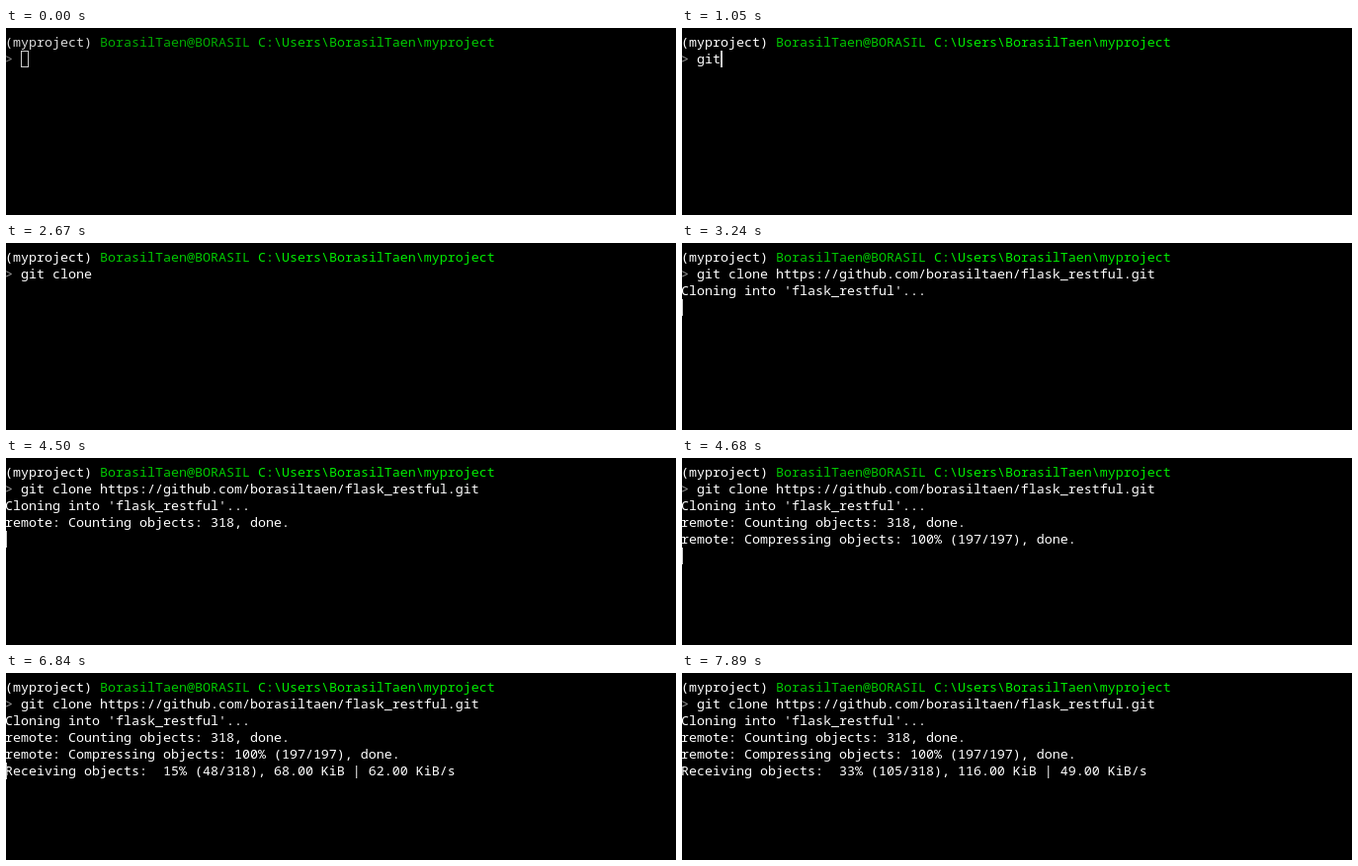
An HTML page for the animation above (8 s loop, 678 px wide and 190 px high).

```html
<!DOCTYPE html>
<html lang="en">
<head>
<meta charset="utf-8">
<title>Terminal clone</title>
<style>
  html, body { margin: 0; width: 100%; height: 100%; overflow: hidden; background: #000; }
  #stage { position: relative; width: 678px; height: 190px; overflow: hidden; background: #000; }
  pre {
    position: absolute; left: -1px; top: 6px; margin: 0; color: #fff;
    font: 13.3333px/17px "Noto Sans Mono", "DejaVu Sans Mono", monospace;
    font-variant-ligatures: none;
  }
  pre div { height: 17px; }
  .user { color: #00c800; }
  .path { color: #00ec00; }
  .mark { color: #a0a0a0; }
  .inactive pre { opacity: .86; }
  #cursor { position: absolute; box-sizing: border-box; width: 2px; height: 17px; background: #ccc; }
  .inactive #cursor { width: 8px; background: none; border: 1px solid #ccc; }
</style>
</head>
<body>
<div id="stage">
  <pre><div>(myproject) <span class="user">BorasilTaen@BORASIL</span> <span class="path">C:\Users\BorasilTaen\myproject</span></div><div><span class="mark">&gt;</span> <span id="typed"></span></div><div class="out"></div><div class="out"></div><div class="out"></div><div class="out"></div></pre>
  <div id="cursor"></div>
</div>
<script>
const LOOP = 8000, FOCUS = 420, PASTE = 2850, ENTER = 3240;
const CELL = 8, ROW = 17, TOP = 6;
const typedPart = 'git clone ';
const command = typedPart + 'https://github.com/borasiltaen/flask_restful.git';
const keyTimes = [810, 930, 1050, 1230, 1500, 1590, 1800, 1890, 2040, 2160];

const receiving = (percent, count, size, rate) =>
  `Receiving objects:  ${percent}% (${count}/318)` + (size ? `, ${size}.00 KiB | ${rate}.00 KiB/s` : '');

// time, output row, text
const output = [
  [ENTER, 0, "Cloning into 'flask_restful'..."],
  [4500, 1, 'remote: Counting objects: 318, done.'],
  [4530, 2, 'remote: Compressing objects:   0% (1/197)'],
  [4680, 2, 'remote: Compressing objects: 100% (197/197), done.'],
  [4860, 3, receiving(14, 45)],
  [5310, 3, receiving(15, 48, 44, 79)],
  [5850, 3, receiving(15, 48, 68, 62)],
  [7050, 3, receiving(16, 51, 100, 51)],
  [7200, 3, receiving(20, 64, 100, 51)],
  [7230, 3, receiving(26, 83, 100, 51)],
  [7380, 3, receiving(33, 105, 116, 49)],
];

// time, screen row, column
const cursorMoves = [[ENTER, 3, 0], [4500, 4, 0], [4680, 5, 0], [5310, 5, 1], [5340, 5, 0]];
const cursorHidden = [[2670, PASTE], [3750, 4260], [6330, 6840], [7890, LOOP]];

const stage = document.getElementById('stage');
const typed = document.getElementById('typed');
const cursor = document.getElementById('cursor');
const rows = [...document.querySelectorAll('.out')];

function setText(element, text) {
  if (element.textContent !== text) element.textContent = text;
}

function render(t) {
  const past = ([time]) => time <= t;
  const length = t >= PASTE ? command.length : keyTimes.filter(time => time <= t).length;

  stage.className = t < FOCUS ? 'inactive' : '';
  setText(typed, command.slice(0, length));
  rows.forEach((element, row) => {
    const shown = output.filter(entry => entry[1] === row && past(entry)).pop();
    setText(element, shown ? shown[2] : '');
  });

  const [, row, column] = cursorMoves.filter(past).pop() || [0, 1, 2 + length];
  cursor.style.left = column * CELL - 1 + 'px';
  cursor.style.top = TOP + row * ROW + 'px';
  const hidden = cursorHidden.some(([from, to]) => t >= from && t < to);
  cursor.style.visibility = hidden ? 'hidden' : 'visible';
}

const start = performance.now();
function tick() {
  render((performance.now() - start) % LOOP);
  requestAnimationFrame(tick);
}
tick();
</script>
</body>
</html>
```
